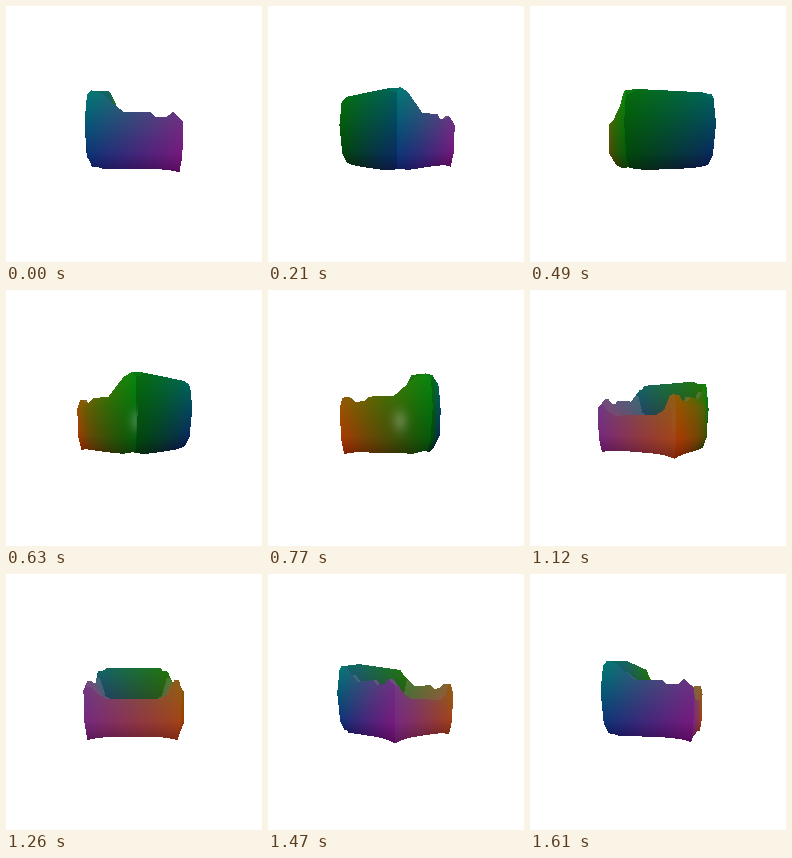
An HTML page with a canvas for the animation above (1680 ms loop, 256 px wide and 256 px high).

```html
<!DOCTYPE html>
<html>
<head>
<meta charset="utf-8">
<style>
html, body { margin: 0; width: 100%; height: 100%; overflow: hidden; background: #fff; }
canvas { display: block; }
</style>
</head>
<body>
<canvas id="stage" width="256" height="256"></canvas>
<script>
const SIZE = 256, STEP = 70, STEPS = 24, CAMERA = 240, CX = 128, CY = 130;
const ctx = document.getElementById('stage').getContext('2d');
const image = ctx.createImageData(SIZE, SIZE);
const pixels = new Uint32Array(image.data.buffer);
const depth = new Float32Array(SIZE * SIZE);
const lerp = (a, b, t) => a + (b - a) * t;
const clamp = t => Math.max(0, Math.min(1, t));

// Armchair: x to the viewer's right, y up, z to the front
const armProfile = [[-40, 34], [-36, 38], [-27, 35], [-9, 20], [14, 20], [18, 16], [28, 16], [33, 20], [40, 14]];
const xs = [-40, -36, -30, -22, 0, 22, 30, 36, 40];
const zs = [-40, -36, -27, -22, -18, -9, 3, 14, 18, 28, 33, 40];

function armHeight(x, z) {
  if (x > 0 && z > 33) return 20;
  const i = Math.max(1, armProfile.findIndex(p => p[0] >= z));
  const [z0, y0] = armProfile[i - 1], [z1, y1] = armProfile[i];
  return lerp(y0, y1, (z - z0) / (z1 - z0));
}

function topHeight(x, z) {
  if (Math.abs(x) > 30) return armHeight(x, z);
  if (z <= -22) return z < -36 ? 38 : 39;
  return Math.abs(x) > 25 ? 8 : 4;
}

// The right arm bulges outwards halfway along its depth
function swell(x, z, amount) {
  if (x <= 0) return x * 1.03;
  return x * (0.95 + 0.24 * amount * clamp(1 - ((z - 4) / 38) ** 2));
}

function footHeight(x, z) {
  const edge = (x / 40) ** 4;
  return z < -30 ? -28.5 + 2.5 * edge : -27.5 - 3 * edge * (Math.max(z, 0) / 40) ** 4;
}

const topPoint = (x, z) => [swell(x, z, 0.3) * 0.98, topHeight(x, z), z * 0.98];

function ring(x, z) {
  const corner = Math.abs(x) === 40 && Math.abs(z) === 40;
  const at = (y, s, bulge) => [swell(x, z, bulge) * s, y, z * s];
  return [
    topPoint(x, z),
    at(Math.min(11, topHeight(x, z) - 1), corner ? 1.02 : 1, 1),
    at(-17, corner && z < 0 ? 0.97 : 1, 1),
    at(footHeight(x, z), z < -30 ? 0.89 : 0.95, 0.6)
  ];
}

const triangles = [];
function quad(a, b, c, d, lift) {
  triangles.push([a, b, c, lift], [a, c, d, lift]);
}

function wall(a, b, lift) {
  const p = ring(...a), q = ring(...b);
  for (let k = 0; k < 3; k++) quad(p[k], q[k], q[k + 1], p[k + 1], lift);
}

for (let i = 1; i < xs.length; i++) {
  const x0 = xs[i - 1], x1 = xs[i];
  wall([x0, 40], [x1, 40], 0.15);
  wall([x0, -40], [x1, -40], -0.2);
  for (let j = 1; j < zs.length; j++) {
    const z0 = zs[j - 1], z1 = zs[j];
    quad(topPoint(x0, z0), topPoint(x1, z0), topPoint(x1, z1), topPoint(x0, z1), z0 >= -18 ? 0.35 : -0.1);
  }
}
for (let j = 1; j < zs.length; j++)
  for (const x of [-40, 40]) wall([x, zs[j - 1]], [x, zs[j]], 0);

// Corner colours, bottom then top
const palette = {
  frontLeft: [[122, 15, 122], [105, 65, 135]],
  frontRight: [[180, 45, 5], [135, 108, 0]],
  backLeft: [[15, 33, 120], [0, 125, 115]],
  backRight: [[0, 78, 8], [8, 138, 12]]
};

function shade(x, y, z, lift, sx, sy) {
  const u = clamp((x + 40) / 80), v = clamp((y + 30) / 68), w = clamp((z + 40) / 80);
  const glow = x > 36 ? 0.25 * Math.exp(-(((sx - 132) / 8) ** 2) - ((sy - 131) / 11) ** 2) : 0;
  const under = 1 - 0.22 * clamp((-14 - y) / 15);
  let rgb = 0xff000000;
  for (let k = 0; k < 3; k++) {
    const mix = name => lerp(palette[name][0][k], palette[name][1][k], v);
    let c = lerp(lerp(mix('backLeft'), mix('backRight'), u), lerp(mix('frontLeft'), mix('frontRight'), u), w);
    c = lift < 0 ? c * (1 + lift) : lerp(c, 125, lift);
    rgb |= lerp(c * under, 220, glow) << (8 * k);
  }
  return rgb;
}

function fill(a, b, c, lift, project) {
  const [ax, ay, as] = project(a), [bx, by, bs] = project(b), [cx, cy, cs] = project(c);
  const area = (bx - ax) * (cy - ay) - (by - ay) * (cx - ax);
  if (Math.abs(area) < 1e-6) return;
  const x1 = Math.max(ax, bx, cx), y1 = Math.max(ay, by, cy);
  for (let y = Math.floor(Math.min(ay, by, cy)); y <= y1; y++)
    for (let x = Math.floor(Math.min(ax, bx, cx)); x <= x1; x++) {
      const px = x + 0.5, py = y + 0.5;
      const p = ((bx - px) * (cy - py) - (by - py) * (cx - px)) / area;
      const q = ((cx - px) * (ay - py) - (cy - py) * (ax - px)) / area;
      const r = 1 - p - q;
      if (p < 0 || q < 0 || r < 0) continue;
      const near = p * as + q * bs + r * cs, i = y * SIZE + x;
      if (near <= depth[i]) continue;
      depth[i] = near;
      const at = k => p * a[k] + q * b[k] + r * c[k];
      pixels[i] = shade(at(0), at(1), at(2), lift, px, py);
    }
}

function render(step) {
  const angle = (90 + step * 360 / STEPS) * Math.PI / 180;
  const cos = Math.cos(angle), sin = Math.sin(angle);
  const project = ([x, y, z]) => {
    const s = CAMERA / (CAMERA + x * sin - z * cos);
    return [CX + (x * cos + z * sin) * s, CY - y * s, s];
  };
  pixels.fill(0xffffffff);
  depth.fill(0);
  for (const [a, b, c, lift] of triangles) fill(a, b, c, lift, project);
  ctx.putImageData(image, 0, 0);
}

const start = performance.now();
let shown = -1;
function tick() {
  const step = Math.floor((performance.now() - start) / STEP) % STEPS;
  if (step !== shown) render(shown = step);
  requestAnimationFrame(tick);
}
tick();
</script>
</body>
</html>
```
